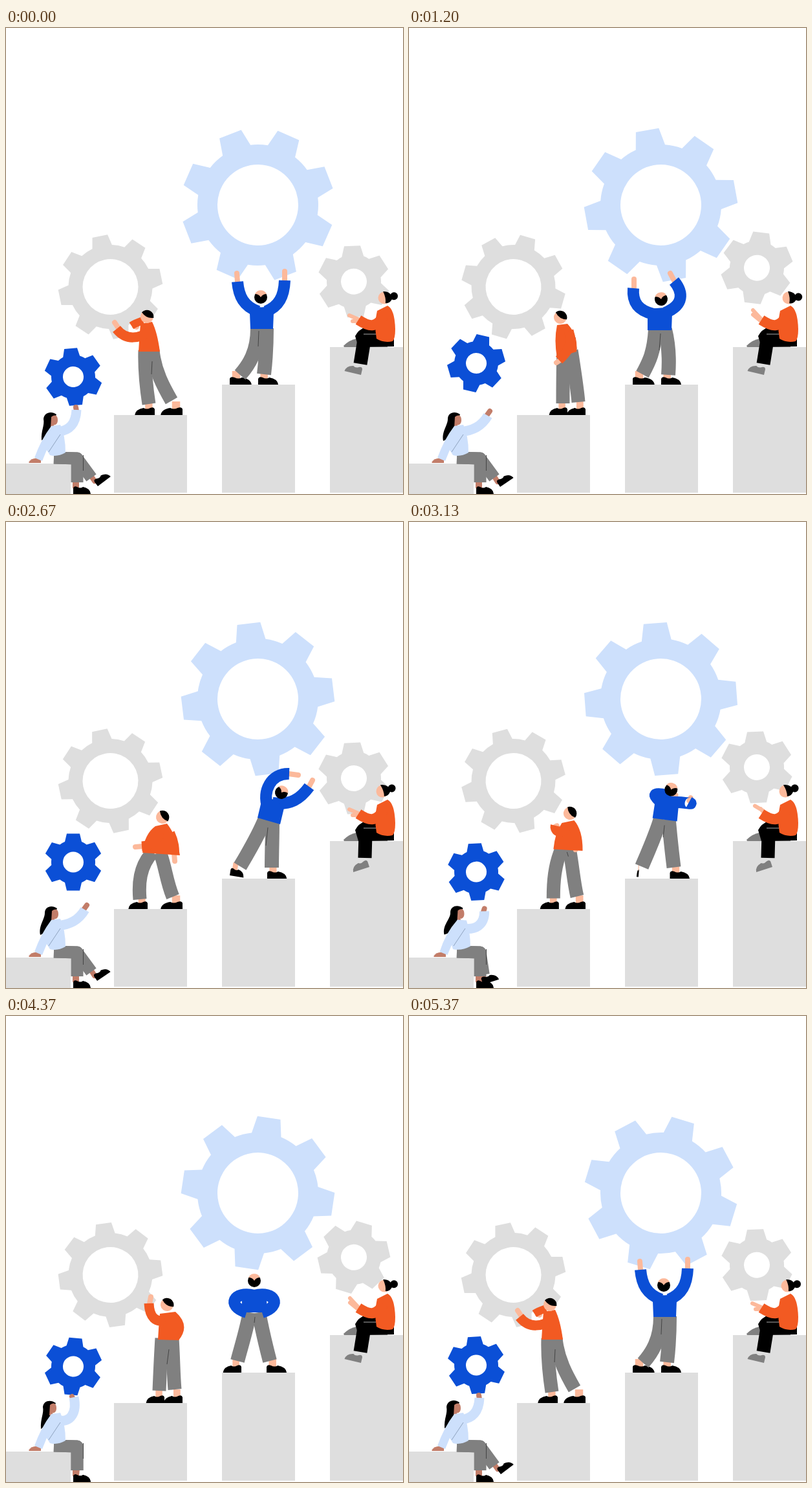
An HTML page for the animation above (5410 ms loop, 614 by 720 pixels).

```html
<!DOCTYPE html>
<html lang="en">
<head>
<meta charset="utf-8">
<title>Gears</title>
<style>
html,body{margin:0;width:100%;height:100%;overflow:hidden;background:#fff}
svg{display:block;width:614px;height:720px}
.grey{fill:#dedede}.pale{fill:#cde0fc}.blue{fill:#0b4fd6}.orange{fill:#f25a22}.skin{fill:#fcb99b}.brown{fill:#c27d69}.slate{fill:#808080}
.limb{fill:none;stroke-linejoin:round}
.limb.pale{stroke:#cde0fc}.limb.blue{stroke:#0b4fd6}.limb.orange{stroke:#f25a22}.limb.slate{stroke:#808080}.limb.black{stroke:#000}
.limb.skin{stroke:#fcb99b;stroke-width:8;stroke-linecap:round}
.limb.brown{stroke:#c27d69;stroke-width:8;stroke-linecap:round}
.crease{fill:none;stroke:#444;stroke-width:1}
</style>
</head>
<body>
<svg viewBox="0 0 614 720">
<defs>
  <path id="shoe" d="M0 0V-9Q1 -13 6 -11Q11 -8 15 -11Q26 -9 27 0Z"/>
  <g id="foot"><path class="skin" d="M3 -21H13V-8H3Z"/><use href="#shoe"/></g>
</defs>

<path id="gearA" class="pale" fill-rule="evenodd"/>
<path id="gearB" class="grey" fill-rule="evenodd"/>
<path id="gearC" class="blue" fill-rule="evenodd"/>
<path id="gearD" class="grey" fill-rule="evenodd"/>

<path class="grey" d="M0 673H100V720H0ZM167 598H280V718H167ZM334 551H447V718H334ZM501 493H614V718H501Z"/>

<g id="sitterLeft">
  <path class="brown" d="M103 700H113V711H103Z"/>
  <path class="limb brown" id="s-ankle"/>
  <use href="#shoe" transform="translate(104 720)"/>
  <use href="#shoe" id="s-shoe"/>
  <path class="limb slate" stroke-width="19" d="M74 664L110 665L110 702"/>
  <path class="limb slate" stroke-width="19" id="s-leg"/>
  <path class="crease" d="M119.500 660V684"/>
  <path id="s-hair"/>
  <path class="brown" id="s-face" d="M70 601C78 595 80 601 80 606C80 612 76 614 74 613L75 618L69 617Z"/>
  <path class="brown" id="s-rest" d="M35 671Q41 662 54 666V672H36Z"/>
  <path class="limb brown" id="s-hand"/>
  <path class="limb pale" stroke-width="15" id="s-arm"/>
  <path class="pale" id="s-torso"/>
  <path class="crease" id="s-fold" d="M84 628L66 655" style="stroke:#8fa3bf"/>
</g>

<g id="pusher">
  <use href="#foot" id="p-footL"/>
  <use href="#foot" id="p-footR"/>
  <path class="limb slate" stroke-width="21" id="p-legL"/>
  <path class="limb slate" stroke-width="21" id="p-legR"/>
  <path class="crease" id="p-crease"/>
  <path class="limb skin" id="p-handB"/>
  <path class="limb orange" stroke-width="12" id="p-armB"/>
  <path class="orange" id="p-torso"/>
  <g id="p-head"><circle class="skin" r="10"/><path d="M-6 -8.500A10.500 10.500 0 0 1 9.500 4.500Q-2 3 -6 -8.500Z"/></g>
  <path class="limb skin" id="p-handF"/>
  <path class="limb orange" stroke-width="15" id="p-armF"/>
</g>

<g id="lifter">
  <use href="#foot" id="l-footL"/>
  <use href="#foot" id="l-footR"/>
  <path class="limb slate" stroke-width="22" id="l-legL"/>
  <path class="limb slate" stroke-width="22" id="l-legR"/>
  <path class="crease" id="l-crease"/>
  <path class="limb skin" id="l-handL"/>
  <path class="limb skin" id="l-handR"/>
  <path class="limb blue" stroke-width="18" id="l-armL"/>
  <path class="limb blue" stroke-width="18" id="l-armR"/>
  <path class="blue" id="l-torso"/>
  <g id="l-head"><circle r="10"/><path class="skin" d="M-9 -5A10 10 0 0 1 9 -5Q3 -5 0 0Q-3 -5 -9 -5Z"/></g>
</g>

<g id="sitterRight">
  <path class="slate" id="r-back" d="M522 491Q531 482 542 480L547 493H523Z"/>
  <path id="r-thigh"/>
  <use href="#shoe" class="slate" id="r-shoe"/>
  <path class="limb black" stroke-width="21" id="r-leg"/>
  <path class="crease" d="M553 473H572" style="stroke:#aaa"/>
  <g id="r-head">
    <circle class="skin" r="9.500"/>
    <path d="M-2 -10Q12 -10 12 2Q8 9 2 8Q3 0 -2 -10Z"/>
    <circle cx="15" cy="-3" r="6"/>
  </g>
  <path class="orange" d="M574 437L590 429Q601 434 602 465Q602 480 598 484Q584 487 573 480Q569 458 574 437Z"/>
  <path class="limb skin" id="r-hand" style="stroke-width:6"/>
  <path class="limb orange" stroke-width="16" id="r-arm"/>
</g>
</svg>
<script>
const LOOP = 5410;
const TIMES = [0, 1200, 1970, 2670, 3600, 4370, 5370, LOOP];
const LIFT_TIMES = [0, 215, 985, 1200, 1970, 2670, 3600, 4370, 5370, LOOP];
const $ = id => document.getElementById(id);
const clamp = x => Math.max(0, Math.min(1, x));
const tracks = [];

function locate(times, t) {
  let i = 0;
  while (i < times.length - 2 && t >= times[i + 1]) i++;
  return [i, clamp((t - times[i]) / (times[i + 1] - times[i]))];
}

function lerp(times, values, t) {
  const [i, u] = locate(times, t);
  return values[i] + (values[i + 1] - values[i]) * u;
}

// Blend every number in two strings of the same structure.
const NUM = /-?[\d.]+/g;
function blend(a, b, u) {
  if (a === b) return a;
  const to = b.match(NUM);
  let k = 0;
  return a.replace(NUM, n => (+n + (to[k++] - n) * u).toFixed(2));
}

// The digits of order choose which pose holds at each key time.
function track(id, attr, order, poses, times = TIMES) {
  tracks.push({ el: $(id), attr, times, poses: [...order].map(i => poses[i]) });
}

function gearPath(teeth, body, outer, top, base, hole) {
  const foot = Math.sqrt(body * body - base * base);
  const arc = `A${body} ${body} 0 0 1 `;
  let d = '', first;
  for (let i = 0; i < teeth; i++) {
    const a = 2 * Math.PI * i / teeth, c = Math.cos(a), s = Math.sin(a);
    const p = (x, y) => `${(x * c - y * s).toFixed(2)} ${(x * s + y * c).toFixed(2)}`;
    const start = p(-base, -foot);
    first = first || start;
    d += `${i ? arc : 'M'}${start}L${p(-top, -outer)}L${p(top, -outer)}L${p(base, -foot)}`;
  }
  return `${d}${arc}${first}ZM${-hole} 0a${hole} ${hole} 0 1 0 ${2 * hole} 0a${hole} ${hole} 0 1 0 ${-2 * hole} 0Z`;
}

$('gearA').setAttribute('d', gearPath(8, 93.5, 117.5, 18, 23, 62.5));
$('gearB').setAttribute('d', gearPath(8, 65, 80, 12, 15.5, 43));
$('gearC').setAttribute('d', gearPath(6, 34, 44, 10, 13, 16));
$('gearD').setAttribute('d', gearPath(6, 42, 55, 12.5, 17, 20));

function place(id, x, y, angle) {
  $(id).setAttribute('transform', `translate(${x.toFixed(2)} ${y.toFixed(2)})rotate(${angle.toFixed(2)})`);
}

// Seated woman on the left: holding, arm out, leaning forward, feet down
const LEFT = '01112300';
track('s-hair', 'd', LEFT, [
  'M78 597C70 591 59 594 58 604C60 614 54 622 55 637C62 634 69 624 71 613Z',
  'M79 597C71 591 60 594 60 604C60 614 50 624 53 638C64 634 68 622 72 613Z',
  'M88 596C80 590 69 592 68 602C70 612 52 622 56 637C68 637 78 624 81 612Z',
  'M77 598C69 592 58 594 57 604C59 614 53 622 54 638C61 634 68 624 70 614Z']);
track('s-face', 'transform', LEFT, ['translate(0 0)', 'translate(1 0)', 'translate(10 -1)', 'translate(-2 0)']);
track('s-rest', 'transform', '00001000', ['translate(0 0)', 'translate(6 0)']);
track('s-fold', 'transform', '00001000', ['translate(0 0)', 'translate(6 0)']);
track('s-torso', 'd', '00001000', [
  'M70 615L84 613Q92 630 92 656Q80 663 68 660L63 652L56 669L44 664Q54 636 70 615Z',
  'M80 614L94 618Q98 640 98 655Q82 663 68 660L69 655L63 669L51 664Q58 636 80 614Z']);
track('s-arm', 'd', LEFT, [
  'M80 624C98 622 108 612 109 590', 'M80 624C98 622 112 616 122 599',
  'M86 632C108 640 122 630 111 604', 'M80 624C100 630 110 612 105 589']);
track('s-hand', 'd', LEFT, ['M109 592L108 586', 'M120 599L125 592', 'M110 606L108 603', 'M104 592L102 588']);
track('s-leg', 'd', LEFT, [
  'M74 664L110 665L132 695', 'M74 664L110 665L132 695', 'M74 664L110 665L98 704', 'M74 664L110 665L110 702']);
track('s-ankle', 'd', LEFT, ['M130 690L137 700', 'M130 690L137 701', 'M98 700L94 710', 'M110 700L109 710']);
track('s-shoe', 'transform', LEFT, [
  'translate(142 708)rotate(-37)scale(.92 .95)', 'translate(141 709)rotate(-34)scale(.92 .95)',
  'translate(87 720)rotate(0)scale(1 1)', 'translate(104 720)rotate(0)scale(1 1)']);

// Man pushing the grey gear
const PUSH = '01234500';
track('p-footL', 'transform', '01121100', [
  'translate(230 598)scale(-1.14 1)', 'translate(245 598)scale(-1.05 1)', 'translate(219 598)scale(-1.1 1)']);
track('p-footR', 'transform', '01101100', [
  'translate(273 598)scale(-1.25 1)', 'translate(273 598)scale(-1.08 1)']);
track('p-legL', 'd', PUSH, [
  'M215 498C214 530 217 555 221 581', 'M239 498C238 530 238 555 238 580',
  'M246 498C244 530 242 555 240 580', 'M227 510C206 532 205 560 207 583',
  'M246 498C244 530 242 555 240 580', 'M241 498C239 530 238 555 237 579']);
track('p-legR', 'd', PUSH, [
  'M227 498C230 530 244 555 256 576', 'M251 498C256 530 260 555 262 578',
  'M258 498C260 530 261 555 262 578', 'M238 510C246 530 248 555 258 579',
  'M258 498C260 530 261 555 262 578', 'M257 498C259 530 259 555 261 577']);
track('p-crease', 'd', PUSH, [
  'M226 515L225 535', 'M257 478L259 496', 'M255 515L253 538', 'M234 505L240 496', 'M255 515L253 538', 'M252 515L249 538']);
track('p-torso', 'd', PUSH, [
  'M208 457L226 454Q234 470 238 500L205 500Q206 480 208 457Z',
  'M229 459L245 457Q262 475 259 500L229 510Q224 482 229 459Z',
  'M243 459L259 457Q274 462 272 499L237 500Q238 475 243 459Z',
  'M231 470L249 466Q264 485 269 515L211 511Q214 482 231 470Z',
  'M242 460L262 456Q274 468 268 501L236 500Q238 478 242 460Z',
  'M238 460L262 457Q286 478 267 501L235 500Q236 480 238 460Z']);
track('p-head', 'transform', PUSH, [
  'translate(218 446)rotate(-15)', 'translate(234 447)rotate(-8)', 'translate(255 446)rotate(5)',
  'translate(242 456)rotate(12)', 'translate(256 444)rotate(16)', 'translate(249 446)rotate(-8)']);
track('p-armF', 'd', PUSH, [
  'M224 468C206 480 186 484 171 465', 'M247 468C254 488 246 500 232 513',
  'M264 466C278 472 278 492 256 494', 'M240 480C232 494 224 500 210 501',
  'M252 466C228 476 226 448 243 436', 'M246 470C232 474 222 466 221 444']);
track('p-handF', 'd', PUSH, [
  'M174 464L168 455', 'M234 513L228 517', 'M256 496L244 498', 'M212 501L200 502', 'M246 437L254 438', 'M222 445L224 434']);
track('p-armB', 'd', PUSH, [
  'M212 452C206 454 200 456 194 460', 'M240 465C240 475 240 485 239 495',
  'M255 465C255 475 255 485 254 490', 'M255 480C262 495 262 505 262 514',
  'M255 465C255 475 255 485 254 490', 'M252 465C252 475 252 485 252 490']);
track('p-handB', 'd', PUSH, [
  'M199 461L202 462', 'M240 490L240 494', 'M254 485L254 488', 'M260 512L261 524', 'M254 485L254 488', 'M252 485L252 488']);

// Man with the large gear: arms up, dragging left, leaning right, hands on hips
function lift(id, attr, ...poses) {
  track(id, attr, '0101023300', poses, LIFT_TIMES);
}
lift('l-footL', 'transform',
  'translate(346 551)rotate(0)scale(1.25 1)', 'translate(346 551)rotate(0)scale(1.25 1)',
  'translate(346 546)rotate(9)scale(.8 1)', 'translate(364 551)rotate(0)scale(-1.05 1)');
lift('l-footR', 'transform',
  'translate(390 551)scale(1.15 1)', 'translate(390 551)scale(1.15 1)',
  'translate(404 551)scale(1.12 1)', 'translate(403 551)scale(1.15 1)');
lift('l-legL', 'd',
  'M389 464C389 500 376 520 362 536', 'M381 466C379 500 372 515 361 535',
  'M401 458C390 485 374 512 362 532', 'M377 458C372 485 364 510 358 533');
lift('l-legR', 'd',
  'M403 464C403 490 402 510 399 535', 'M396 466C402 490 403 510 401 536',
  'M412 461C412 490 411 510 411 534', 'M391 458C396 485 402 510 408 533');
lift('l-crease', 'd', 'M391 468L390 492', 'M389 472L387 498', 'M405 472L402 500', 'M385 465L384 474');
lift('l-handL', 'd', 'M358 392L357 379', 'M348 401L348 388', 'M437 389L452 391', 'M368 452L372 454');
lift('l-handR', 'd', 'M431 390L431 376', 'M411 392L404 379', 'M468 410L474 399', 'M398 452L396 454');
lift('l-armL', 'd',
  'M358 392C360 415 368 430 390 438', 'M347 402C345 425 356 437 378 442',
  'M405 442C396 415 410 388 438 389', 'M384 432C352 424 340 448 372 458');
lift('l-armR', 'd',
  'M431 390C430 415 422 430 402 438', 'M410 391C424 408 426 428 396 440',
  'M412 434C440 438 455 428 469 409', 'M384 432C416 424 428 448 396 458');
lift('l-torso', 'd',
  'M384 429Q395 434 406 429L414 440L413 465L378 465L377 440Z',
  'M374 433Q390 433 402 431L407 440L406 467L369 467L369 438Z',
  'M398 422Q406 430 418 428L430 442L424 467L389 457L394 436Z',
  'M365 422Q384 424 403 422L403 440L405 458L364 458L365 440Z');
lift('l-head', 'transform',
  'translate(394 416)rotate(0)', 'translate(390 419)rotate(-8)', 'translate(426 418)rotate(35)', 'translate(384 409)rotate(0)');

// Seated woman on the right
track('r-head', 'transform', '01022000', [
  'translate(585 417)rotate(1)', 'translate(587 417)rotate(6)', 'translate(582 416)rotate(-6)']);
track('r-thigh', 'd', '00100000', [
  'M574 461L556 462Q545 466 540 476L545 493L600 492L600 478Z',
  'M574 447L556 446Q548 462 543 476L547 493L600 492L600 478Z']);
track('r-back', 'transform', '00100000', ['translate(0 0)', 'translate(9 0)']);
track('r-leg', 'd', '00111000', ['M590 482L554 482L548 519', 'M590 482L556 482L555 519']);
track('r-shoe', 'transform', '00111000', [
  'translate(549 536)rotate(13)scale(-.97 1)', 'translate(562 533)rotate(-18)scale(-.97 1)']);
track('r-arm', 'd', '00100000', ['M584 445C572 464 562 462 545 451', 'M582 445C575 466 560 458 549 441']);
track('r-hand', 'd', '01202100', [
  'M545 450L531 444M543 453L536 453', 'M545 450L532 436M543 452L532 443', 'M549 441L539 433M550 440L552 433']);

const PEAKS = [-225, 508, 1241, 2986, 3719, 4452, 5185];

function tossedGear(t) {
  const dt = PEAKS.map(p => t - p).reduce((a, b) => Math.abs(b) < Math.abs(a) ? b : a);
  const lean = lerp([0, 1550, 1970, 2550, LOOP], [0, 0, 1, 0, 0], t);
  const y = Math.min(396 - 16 * lean, 370 + 425e-6 * dt * dt);
  place('gearD', 538 + 15 * lean, y, -2.6 + 8 * lean + 60 * clamp(-dt / 250));
}

function draw() {
  const t = performance.now() % LOOP;
  for (const { el, attr, times, poses } of tracks) {
    const [i, u] = locate(times, t);
    el.setAttribute(attr, blend(poses[i], poses[i + 1], u * u * (3 - 2 * u)));
  }
  place('gearA', 389.5, 273.5, lerp(LIFT_TIMES, [23.7, 34.7, 68.7, 79.7, 114.6, 128.1, 133.4, 143.4, 151.7, 158.7], t));
  place('gearB', 161.5, 400, lerp(TIMES, [-11.7, 16, 31.3, 33, 26.3, 37.4, 78.2, 78.3], t));
  place('gearC', 104, lerp(TIMES, [539, 518, 519, 525.5, 556, 541.5, 539.5, 539], t),
    lerp(TIMES, [-5.2, 13.6, 11, 0, -6, 4.6, -4, -5.2], t));
  tossedGear(t);
  requestAnimationFrame(draw);
}
draw();
</script>
</body>
</html>
```
